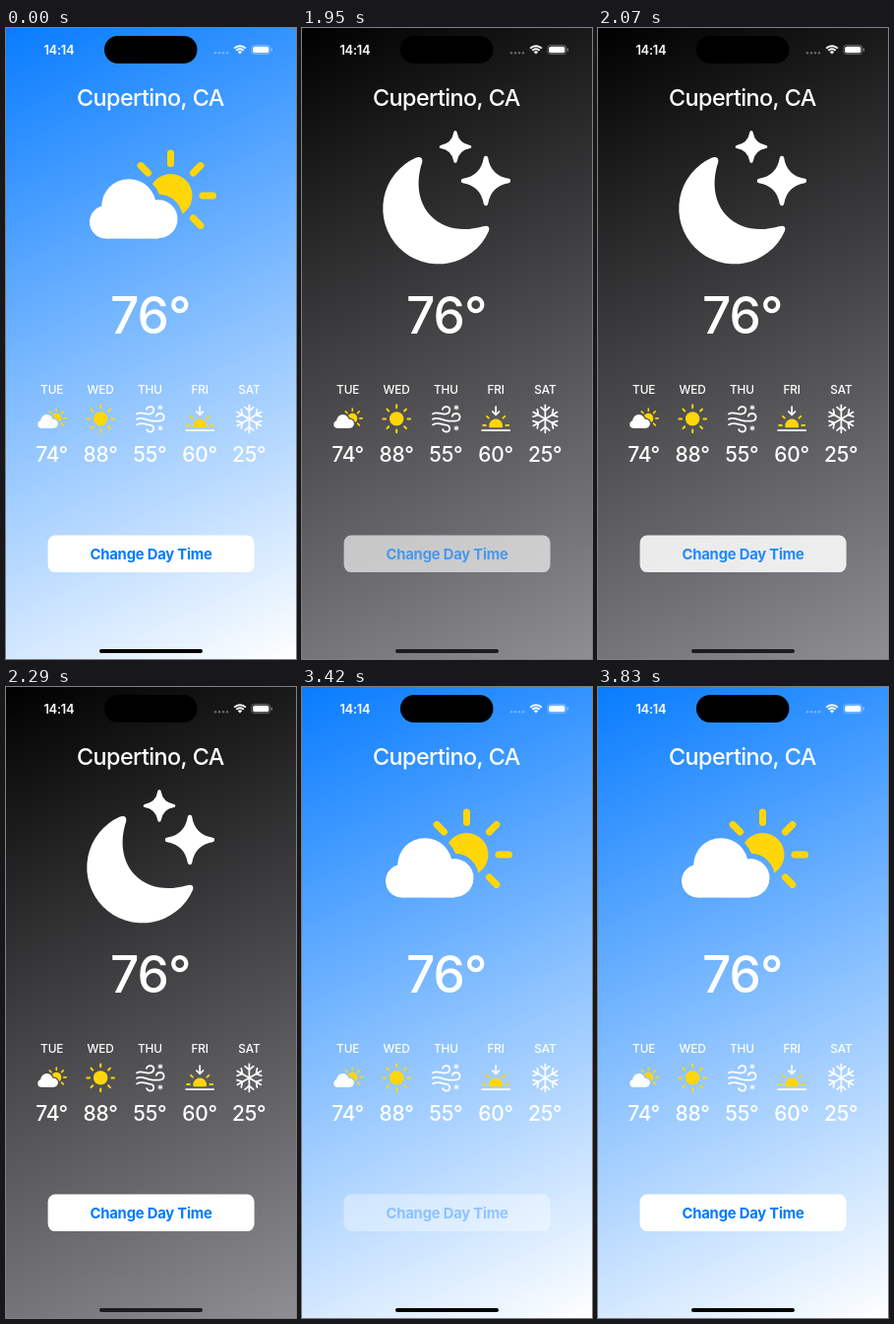
An HTML page with a canvas that plays this animation: 295x640 px, repeating every 5.5 s.

```html
<!DOCTYPE html>
<html lang="en">
<head>
<meta charset="utf-8">
<title>Weather</title>
<style>
  html, body { margin: 0; width: 100%; height: 100%; overflow: hidden; background: #000; }
  canvas { display: block; width: 295px; height: 640px; }
</style>
</head>
<body>
<canvas id="stage"></canvas>
<script>
const W = 295, H = 640, LOOP = 5500;
const NIGHT_START = 1850, NIGHT_END = 3420;
const WHITE = '#fff', YELLOW = '#ffd60a', BLUE = '#007aff';

// Button opacity after each tap: [start time, opacity]
const FADES = [
  [0, 1],
  [1850, .35], [1950, .64], [2070, .87], [2190, .97], [2290, 1],
  [3420, .36], [3530, .65], [3630, .87], [3730, .97], [3830, 1],
];

const canvas = document.getElementById('stage');
const ctx = canvas.getContext('2d');
const dpr = window.devicePixelRatio || 1;
canvas.width = W * dpr;
canvas.height = H * dpr;

function text(str, x, y, size, weight = 500, spacing = 0, color = WHITE) {
  ctx.font = `${weight} ${size}px Inter, sans-serif`;
  ctx.letterSpacing = spacing + 'px';
  ctx.textAlign = 'center';
  ctx.fillStyle = color;
  ctx.fillText(str, x + spacing / 2, y);
}

function disc(x, y, r, color) {
  ctx.fillStyle = color;
  ctx.beginPath();
  ctx.arc(x, y, r, 0, Math.PI * 2);
  ctx.fill();
}

function pill(x, y, w, h, r, color) {
  ctx.fillStyle = color;
  ctx.beginPath();
  ctx.roundRect(x, y, w, h, r);
  ctx.fill();
}

function stroke(path, width, color = WHITE) {
  ctx.strokeStyle = color;
  ctx.lineWidth = width;
  ctx.lineCap = ctx.lineJoin = 'round';
  ctx.stroke(new Path2D(path));
}

function at(x, y, scale, draw) {
  ctx.save();
  ctx.translate(x, y);
  ctx.scale(scale, scale);
  draw();
  ctx.restore();
}

// Spokes around the current origin, angles in steps of 45 degrees
function rays(steps, inner, outer, width) {
  for (const step of steps) {
    ctx.save();
    ctx.rotate(step * Math.PI / 4);
    stroke(`M${inner} 0H${outer}`, width, YELLOW);
    ctx.restore();
  }
}

function background(night) {
  const g = ctx.createLinearGradient(0, 0, W, H);
  g.addColorStop(0, night ? '#000' : '#087cff');
  g.addColorStop(1, night ? '#8e8e93' : '#fff');
  ctx.fillStyle = g;
  ctx.fillRect(0, 0, W, H);
}

function statusBar() {
  pill(100, 8, 94.5, 28, 14, '#000');
  text('14:14', 54, 26.5, 12.9, 600, -.25);
  for (let i = 0; i < 4; i++) disc(213 + i * 4, 25.3, 1.2, 'rgba(255,255,255,.35)');
  ctx.strokeStyle = WHITE;
  ctx.lineCap = 'butt';
  ctx.lineWidth = 1.9;
  for (const r of [8.2, 5.2]) {
    ctx.beginPath();
    ctx.arc(238, 26.4, r, -Math.PI * .75, -Math.PI * .25);
    ctx.stroke();
  }
  ctx.fillStyle = WHITE;
  ctx.fill(new Path2D('M238 26.6L235.8 24.2Q238 22.4 240.2 24.2Z'));
  ctx.strokeStyle = 'rgba(255,255,255,.4)';
  ctx.lineWidth = .8;
  ctx.beginPath();
  ctx.roundRect(249.8, 17.4, 19, 9.2, 3);
  ctx.stroke();
  pill(251.2, 18.7, 16.2, 6.6, 1.9, WHITE);
  pill(269.8, 20.5, 1.1, 3, .5, 'rgba(255,255,255,.5)');
}

// Drawn relative to the lower left corner of the cloud, 129 wide
function cloudSun() {
  const puffs = [[40, -33, 27.8], [70, -20.3, 19.5], [16.8, -17.2, 16.8]];
  ctx.save();
  for (const [x, y, r] of puffs.slice(0, 2)) {
    const outside = new Path2D();
    outside.rect(-20, -120, 180, 140);
    outside.arc(x, y, r + 5.5, 0, Math.PI * 2);
    ctx.clip(outside, 'evenodd');
  }
  disc(82.5, -44, 22, YELLOW);
  ctx.restore();
  at(82.5, -44, 1, () => rays([-3, -2, -1, 0, 1], 32.5, 43, 7));
  for (const [x, y, r] of puffs) disc(x, y, r, WHITE);
  ctx.fillStyle = WHITE;
  ctx.fillRect(16.8, -24, 53.2, 23.6);
  ctx.fillRect(40, -10, 30, 9.2);
}

function sun() {
  disc(0, 0, 7.2, YELLOW);
  rays([0, 1, 2, 3, 4, 5, 6, 7], 11.2, 13.8, 2);
}

function windSnow() {
  stroke('M-13.5 -5C-9 -8-6 -4.5-1 -4.8C5 -5 5.5 -12.5 0 -12.2Q-2.8 -12-3.6 -9.6', 1.8);
  stroke('M-13.5 .3C-8 -3-4 2.2 3 2.2H9.5C15.5 2 15.5 -5.4 10.3 -5.4Q7.2 -5.4 6.3 -2.6', 1.8);
  stroke('M-13.5 6C-8 2.7-4 6-.5 6.2C5.3 6.7 4.8 13.2 .3 13.2Q-2.4 13.2-3.3 10.8', 1.8);
  for (const y of [-11.5, 9.5]) {
    for (let i = 0; i < 3; i++) {
      ctx.save();
      ctx.translate(10.5, y);
      ctx.rotate(i * Math.PI / 3);
      stroke('M0 -2.2V2.2', 1);
      ctx.restore();
    }
  }
}

function sunset() {
  stroke('M0 -12.3V-4.3M-3.4 -7.4L0 -4L3.4 -7.4', 1.7);
  ctx.save();
  ctx.beginPath();
  ctx.rect(-16, -12, 32, 20.8);
  ctx.clip();
  disc(0, 7, 6.8, YELLOW);
  ctx.restore();
  at(0, 6.6, 1, () => rays([-4, -3, -1, 0], 10.3, 13, 1.8));
  stroke('M-14 11.7H14', 1.8);
}

function snowflake() {
  for (let i = 0; i < 6; i++) {
    ctx.save();
    ctx.rotate(i * Math.PI / 3);
    stroke('M0 0V-14M-4.3 -11.8L0 -8L4.3 -11.8', 1.7);
    ctx.restore();
  }
}

function star(x, y, r, round) {
  const tip = r - round / 2, c = r * .13;
  ctx.save();
  ctx.translate(x, y);
  const path = `M0 ${-tip}Q${c} ${-c} ${tip} 0Q${c} ${c} 0 ${tip}Q${-c} ${c} ${-tip} 0Q${-c} ${-c} 0 ${-tip}Z`;
  ctx.fillStyle = WHITE;
  ctx.fill(new Path2D(path));
  stroke(path, round);
  ctx.restore();
}

function moonStars() {
  ctx.fillStyle = WHITE;
  ctx.fill(new Path2D('M116 131.5Q123 129.5 122.3 136C115 158 119 178 131 190.5' +
    'C144 204 164 207 184 201.2Q192 199.5 190 206A56.3 56.3 0 1 1 116 131.5Z'));
  star(187, 155, 25.2, 4.5);
  star(156, 120.5, 16.3, 3.2);
}

const DAYS = [
  ['TUE', '74°', 46.7, () => at(-14.4, 9.6, .23, cloudSun)],
  ['WED', '88°', 96.2, sun],
  ['THU', '55°', 146.5, windSnow],
  ['FRI', '60°', 197.2, sunset],
  ['SAT', '25°', 247.4, snowflake],
];

function button(alpha) {
  ctx.globalAlpha = alpha;
  pill(42.6, 514.6, 210, 37.5, 7.5, WHITE);
  text('Change Day Time', 147.7, 538.8, 14.8, 700, -.2, BLUE);
  ctx.globalAlpha = 1;
}

function render(t) {
  const night = t >= NIGHT_START && t < NIGHT_END;
  ctx.setTransform(dpr, 0, 0, dpr, 0, 0);
  background(night);
  statusBar();
  text('Cupertino, CA', 147.2, 79.3, 23.4, 500, -.6);
  if (night) moonStars();
  else at(85, 214, 1, cloudSun);
  text('76°', 147.3, 309.5, 51.5, 500, -1);
  for (const [name, temp, x, icon] of DAYS) {
    text(name, x, 371.2, 11.8, 500, -.1);
    at(x, 396.4, 1, icon);
    text(temp, x, 439.7, 21, 500, -.3);
  }
  button(FADES.findLast(([start]) => t >= start)[1]);
  pill(95, 630, 105, 4, 2, night ? '#1c1c1e' : '#000');
}

const origin = performance.now();
function tick() {
  render((performance.now() - origin) % LOOP);
  requestAnimationFrame(tick);
}
tick();
</script>
</body>
</html>
```
